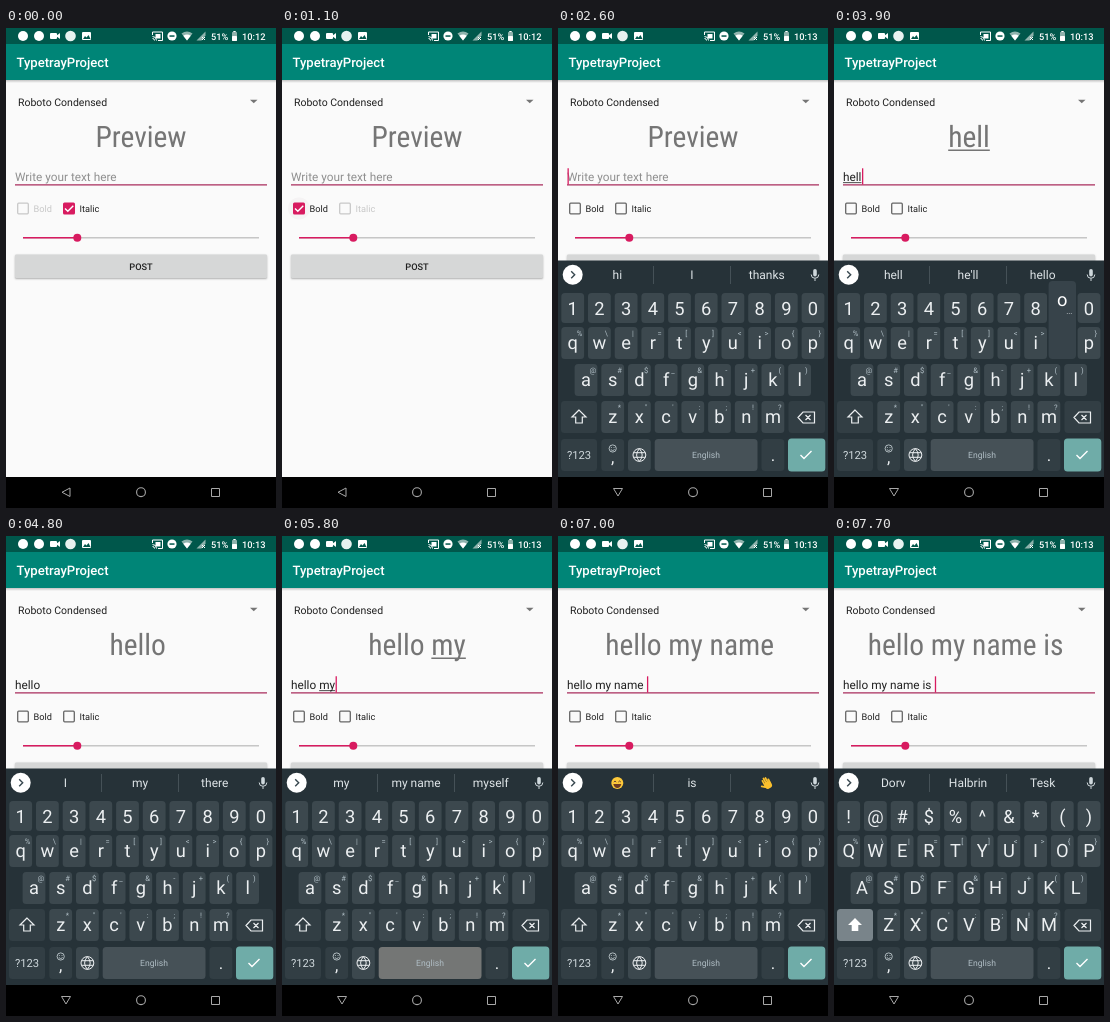
Animation, 270 px wide and 480 px high, one loop 8000 ms. Source, as an HTML page with a canvas:

```html
<!DOCTYPE html>
<html lang="en">
<head>
<meta charset="utf-8">
<title>Font preview app</title>
<style>
html, body { margin: 0; width: 100%; height: 100%; overflow: hidden; background: #fafafa; }
canvas { display: block; width: 270px; height: 480px; }
</style>
</head>
<body>
<canvas id="stage"></canvas>
<script>
const LOOP = 8000, STEP = 100;
const PINK = '#d81b60', INK = '#202020', KEY = '#3c484e', DIM_KEY = '#323e44', KEY_TEXT = '#eceff1', HINT = '#b0bec5';
const canvas = document.getElementById('stage');
const ctx = canvas.getContext('2d');
const dpr = window.devicePixelRatio || 1;
canvas.width = 270 * dpr;
canvas.height = 480 * dpr;

// Timelines: each entry holds from its time until the next one.
const typed = [
  [0, ''], [3300, 'h'], [3500, 'he'], [3700, 'hel'], [3800, 'hell'], [4200, 'hello'], [4500, 'hello '],
  [5300, 'hello m'], [5500, 'hello my'], [5900, 'hello my '], [6400, 'hello my n'],
  [6800, 'hello my name '], [7400, 'hello my name is ']
];
const suggestions = [
  [0, ['hi', 'I', 'thanks']], [3300, ['h', 'hi', 'how']], [3500, ['he', 'hey', 'her']],
  [3700, ['hell', "he'll", 'hello']], [4200, ['hello', 'hello I', 'hellos']], [4500, ['I', 'my', 'there']],
  [5300, ['m', 'my', 'me']], [5500, ['my', 'my name', 'myself']], [5900, ['friend', 'name', 'love']],
  [6400, ['n', 'name', 'new']], [6900, [smile, 'is', wave]], [7500, ['Dorv', 'Halbrin', 'Tesk']]
];
const popups = [
  [3000, 3300, 'h'], [3400, 3500, 'e'], [3500, 3800, 'l'], [3900, 4200, 'o'],
  [5100, 5300, 'm'], [5400, 5500, 'y'], [6200, 6400, 'n']
];
const spacePresses = [[4300, 4500], [5700, 5900]];
const suggestionTaps = [[6600, 6800], [7200, 7400]];
const cursorOn = [[200, 700], [1200, 1700], [2500, 4800], [5300, LOOP]];
const ripples = [[200, 63], [700, 17]];

const rows = [
  { chars: '1234567890', upper: '!@#$%^&*()', hints: '', x: 14.7, y: 265, h: 30 },
  { chars: 'qwertyuiop', hints: '%\\|=[]<>{}', x: 14.7, y: 299, h: 32 },
  { chars: 'asdfghjkl', hints: '@#$_&-+()', x: 28, y: 336, h: 32 },
  { chars: 'zxcvbnm', hints: '*"\':;!?', x: 54.7, y: 373, h: 32 }
];
const PITCH = 26.7;

const valueAt = (track, t) => track.filter(([start]) => start <= t).pop()[1];
const within = (spans, t) => spans.some(([a, b]) => t >= a && t < b);

function rect(x, y, w, h, color, radius = 0) {
  ctx.fillStyle = color;
  ctx.beginPath();
  ctx.roundRect(x, y, w, h, radius);
  ctx.fill();
}
function disc(x, y, r, color) {
  ctx.fillStyle = color;
  ctx.beginPath();
  ctx.arc(x, y, r, 0, 7);
  ctx.fill();
}
function ring(x, y, r, color, width = 1) {
  ctx.strokeStyle = color;
  ctx.lineWidth = width;
  ctx.beginPath();
  ctx.arc(x, y, r, 0, 7);
  ctx.stroke();
}
function fill(d, color) {
  ctx.fillStyle = color;
  ctx.fill(new Path2D(d));
}
function line(d, color, width = 1) {
  ctx.strokeStyle = color;
  ctx.lineWidth = width;
  ctx.stroke(new Path2D(d));
}
function text(s, x, y, size, color, align = 'left', weight = 400) {
  ctx.font = `${weight} ${size}px Roboto, sans-serif`;
  ctx.textAlign = align;
  ctx.fillStyle = color;
  ctx.fillText(s, x, y);
  return ctx.measureText(s).width;
}

// Use the condensed face where there is one, otherwise a uniformly narrowed regular.
function condensed(paint) {
  ctx.save();
  ctx.font = '29.5px Roboto, sans-serif';
  const regular = ctx.measureText('Preview').width;
  ctx.font = '29.5px "Roboto Condensed", Roboto, sans-serif';
  ctx.fontStretch = 'condensed';
  const squeeze = ctx.measureText('Preview').width > regular * 0.95 ? 0.885 : 1;
  ctx.translate(135, 0);
  ctx.scale(squeeze, 1);
  paint();
  ctx.restore();
}

function drawStatusBar(t) {
  rect(0, 0, 270, 16, '#00574b');
  disc(17, 8, 5, '#fff');
  disc(33, 8, 5, '#fff');
  rect(44, 5, 7, 6, '#fff', 1);
  fill('M50 8l4-3v6z', '#fff');
  disc(64.5, 8, 5.3, '#e8f2f0');
  rect(76, 4, 9, 8, '#fff', 1);
  fill('M77 11l2-3 1.5 1.5 2-2.5 2 4z', '#00574b');
  line('M146.500 7V4h10v8.500h-4.500M146.500 8.500a4 4 0 0 1 4 4M146.500 10.500a2 2 0 0 1 2 2', '#fff');
  rect(149.5, 6, 5, 4.5, '#fff');
  disc(166, 8, 4.6, '#fff');
  rect(163.5, 7.3, 5, 1.5, '#00574b');
  fill('M181 12.500l-5.500-7q5.500-4 11 0z', '#8fb3ad');
  fill('M181 12.500l-3.700-4.700q3.700-2.400 7.400 0z', '#fff');
  fill('M190.500 12.500l9-9v4l-4 5z', '#8fb3ad');
  line('M196 9l3 3m0-3l-3 3', '#fff');
  text('51%', 205, 11.7, 9.2, '#fff', 'left', 500);
  rect(226, 4, 5, 9, '#8fb3ad', 0.7);
  rect(227.3, 3, 2.4, 1, '#fff');
  rect(226, 8, 5, 5, '#fff', 0.7);
  text(t < 1200 ? '10:12' : '10:13', 236, 11.7, 9.3, '#fff', 'left', 500);
}

function drawAppBar() {
  const shadow = ctx.createLinearGradient(0, 52, 0, 55);
  shadow.addColorStop(0, 'rgba(0,0,0,.22)');
  shadow.addColorStop(1, 'rgba(0,0,0,0)');
  rect(0, 52, 270, 3, shadow);
  rect(0, 16, 270, 36, '#008577');
  text('TypetrayProject', 10.5, 39, 13.1, '#fff', 'left', 500);
}

function drawPreview(value) {
  condensed(() => {
    ctx.textAlign = 'left';
    ctx.fillStyle = '#757575';
    const shown = value || 'Preview';
    const left = -ctx.measureText(shown).width / 2;
    ctx.fillText(shown, left, 119);
    const word = value.match(/\S+$/);
    if (word) {
      const start = left + ctx.measureText(value.slice(0, word.index)).width;
      rect(start, 121.5, ctx.measureText(word[0]).width, 1.4, '#757575');
    }
  });
}

function drawField(value, t) {
  const width = text(value, 9, 152.8, 11.8, INK);
  if (!value) text('Write your text here', 9, 152.8, 11.8, '#8f8f8f');
  const word = value.match(/\S+$/);
  if (word) {
    const start = ctx.measureText(value.slice(0, word.index)).width;
    rect(9 + start, 154.3, width - start, 0.8, INK);
  }
  rect(9, 156.2, 252, 1.3, '#a92d5d');
  if (within(cursorOn, t)) rect(9.5 + width, 140.3, 1.3, 16.2, PINK);
}

function drawCheckbox(label, x, checked, enabled) {
  const color = !enabled ? '#c8c8c8' : checked ? PINK : '#666';
  if (checked) {
    rect(x - 6, 174.5, 12, 12, color, 1.5);
    line(`M${x - 4} 180.500l2.800 2.800 5.500-5.600`, '#fff', 1.4);
  } else {
    ctx.strokeStyle = color;
    ctx.lineWidth = 1.3;
    ctx.beginPath();
    ctx.roundRect(x - 5.3, 175.2, 10.6, 10.6, 1);
    ctx.stroke();
  }
  text(label, x + 10.5, 184, 9.2, enabled ? INK : '#c8c8c8');
}

function drawForm(t) {
  const value = valueAt(typed, t);
  text('Roboto Condensed', 12, 77.5, 10.5, INK);
  fill('M244 71.700h7.500l-3.750 3.600z', '#757575');
  drawPreview(value);
  drawField(value, t);

  for (const [start, x] of ripples) {
    const p = (t - start) / 500;
    if (p >= 0 && p < 1) disc(x, 180.5, 7 + 5 * p, `rgba(120,60,85,${0.18 * (1 - p)})`);
  }
  const italic = t < 400, bold = t >= 800 && t < 1900;
  drawCheckbox('Bold', 17, bold, !italic);
  drawCheckbox('Italic', 63, italic, !bold);

  rect(17, 209.1, 236, 1.3, '#c6c6c6');
  rect(17, 209.1, 54, 1.3, PINK);
  disc(71.3, 209.7, 4, PINK);

  ctx.save();
  ctx.shadowColor = 'rgba(0,0,0,.3)';
  ctx.shadowBlur = 2 * dpr;
  ctx.shadowOffsetY = dpr;
  rect(9, 226.5, 252, 23.5, '#d6d7d7', 1.3);
  ctx.restore();
  text('POST', 135, 241.7, 9.2, INK, 'center', 500);
}

function smile(x, y) {
  disc(x, y, 6, '#fdc93a');
  line(`M${x - 3.5} ${y - 1}q1.200-2 2.400 0M${x + 1.1} ${y - 1}q1.200-2 2.400 0`, '#5d4037');
  fill(`M${x - 4} ${y + 1}h8q-1 4-4 4t-4-4z`, '#6d3b24');
}
function wave(x, y) {
  ctx.save();
  ctx.translate(x, y);
  ctx.rotate(-0.5);
  rect(-3.5, -1, 7.5, 7, '#fbc02d', 3);
  ctx.lineCap = 'round';
  line('M-2.700 1V-4M-.700 0v-5.500M1.300 0v-5M3.200 1v-3.500M-3 3l-3-2.500', '#fbc02d', 1.7);
  ctx.restore();
}

function drawSuggestions(t) {
  if (within(suggestionTaps, t)) rect(97, 234, 76, 27, '#37444b', 3);
  disc(14.7, 246.7, 10, '#fff');
  line('M13.200 243.200l3.500 3.500-3.500 3.500', '#37474f', 1.4);
  rect(95, 238, 1, 18, '#455157');
  rect(172, 238, 1, 18, '#455157');
  valueAt(suggestions, t).forEach((item, i) => {
    const x = 59.3 + i * 74.7;
    if (typeof item === 'function') item(x, 247);
    else text(item, x, 250.7, 12, '#dfe5e8', 'center');
  });
  rect(255.2, 241, 3.6, 7.5, '#cfd8dc', 1.8);
  line('M253.200 246.500a3.800 3.800 0 0 0 7.600 0M257 250.500v2.500', '#cfd8dc');
}

function drawLetterKeys(caps) {
  for (const row of rows) {
    const baseline = row.y + row.h / 2 + (row.hints ? 5.5 : 6.5);
    [...row.chars].forEach((char, i) => {
      const x = row.x + i * PITCH;
      rect(x - 11.4, row.y, 22.8, row.h, KEY, 3.5);
      const label = caps ? (row.upper || row.chars.toUpperCase())[i] : char;
      text(label, x, baseline, 18.3, KEY_TEXT, 'center');
      if (row.hints) text(row.hints[i], x + 6.8, row.y + 9, 7.6, HINT, 'center');
    });
  }
}

function drawFunctionKeys(t, caps) {
  const arrow = 'M21 382l-7 7h3.700v6h6.600v-6h3.700z';
  rect(3, 373, 36, 32, caps ? '#79848a' : DIM_KEY, 3.5);
  if (caps) fill(arrow, '#fff');
  else line(arrow, KEY_TEXT, 1.2);

  rect(230.5, 373, 36.5, 32, DIM_KEY, 3.5);
  line('M240 389.500l5-5.500h11.500v11h-11.500zM247.500 387l5 5m0-5l-5 5', KEY_TEXT, 1.2);

  rect(3, 411, 36, 32, DIM_KEY, 3.5);
  text('?123', 21, 430.6, 11.2, '#cfd8dc', 'center');

  rect(43.3, 411, 22.8, 32, DIM_KEY, 3.5);
  ring(54.7, 420.5, 3.6, '#cfd8dc', 0.8);
  line('M52.800 421.500q1.900 2.400 3.800 0M53.400 419v.900M56 419v.900', '#cfd8dc', 0.8);
  text(',', 54.7, 435, 17, KEY_TEXT, 'center');

  rect(70, 411, 22.8, 32, KEY, 3.5);
  ring(81.4, 427, 6.4, KEY_TEXT);
  line('M75.500 424.700h11.800M75.500 429.300h11.800M81.400 420.600q-5.600 6.400 0 12.800q5.600-6.400 0-12.800', KEY_TEXT);

  rect(96.7, 411, 102.8, 32, within(spacePresses, t) ? '#747675' : '#465157', 3.5);
  text('English', 148, 430.1, 8.6, HINT, 'center');

  rect(203.5, 411, 22.8, 32, DIM_KEY, 3.5);
  text('.', 215, 432.5, 17, KEY_TEXT, 'center');

  rect(230, 410.5, 37.3, 33, '#6faca8', 3.5);
  line('M242.500 427l3.500 3.500 7.500-7.500', '#fff', 1.4);
}

function drawPopup(char) {
  const row = rows.find(r => r.chars.includes(char));
  const x = row.x + row.chars.indexOf(char) * PITCH;
  const top = row.y + row.h - 78;
  rect(x - 13.7, top, 27.4, 78, '#37434a', 4);
  text(char, x, top + 25, 18.3, '#fff', 'center');
  text('...', x + 7, top + 33, 8, '#dfe5e8', 'center');
}

function drawKeyboard(t) {
  if (t < 2500) return;
  const rest = Math.max(0, (2600 - t) / 160);
  const caps = t >= 7600;
  ctx.save();
  ctx.translate(0, 216 * rest * rest);
  rect(0, 232.5, 270, 217, '#263238');
  drawSuggestions(t);
  drawLetterKeys(caps);
  drawFunctionKeys(t, caps);
  popups.filter(span => within([span], t)).forEach(([, , char]) => drawPopup(char));
  ctx.restore();
}

function drawNavBar(t) {
  rect(0, 449, 270, 31, '#000');
  line(t < 2400 ? 'M64 460v8.500l-8-4.250z' : 'M55.500 460.500h9l-4.500 7.500z', '#a8a8a8');
  ring(135, 464.2, 4.4, '#a8a8a8', 1.1);
  line('M205.500 460.500h8v8h-8z', '#a8a8a8');
}

function draw(t) {
  ctx.setTransform(dpr, 0, 0, dpr, 0, 0);
  ctx.textRendering = 'geometricPrecision';
  rect(0, 0, 270, 480, '#fafafa');
  drawStatusBar(t);
  drawAppBar();
  drawForm(t);
  drawKeyboard(t);
  drawNavBar(t);
}

function tick() {
  const t = performance.now() % LOOP;
  draw(Math.floor(t / STEP) * STEP);
  requestAnimationFrame(tick);
}
tick();
</script>
</body>
</html>
```
